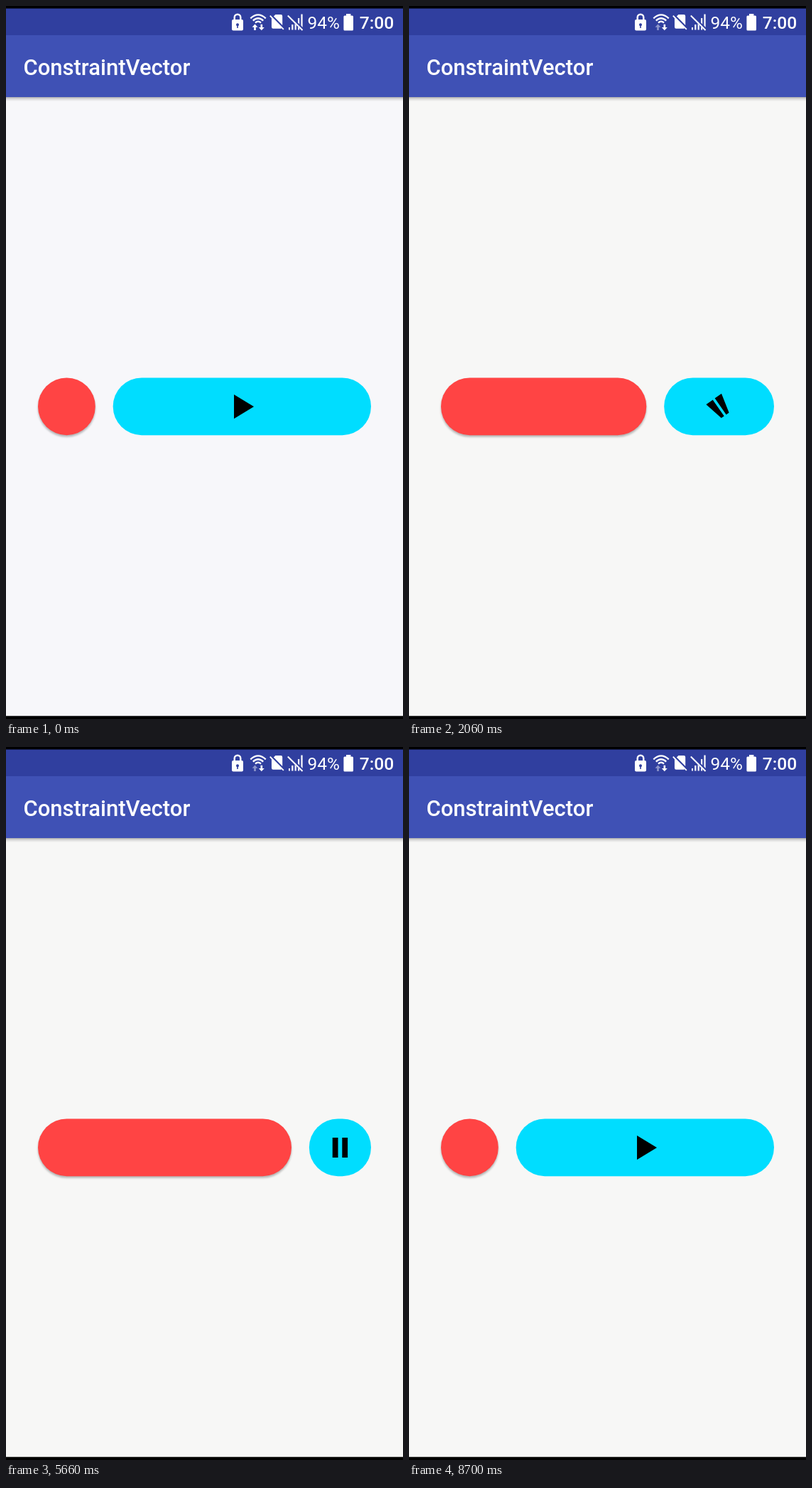
These frames come from a looping animation (559 px wide and 1002 px high, 8740 ms). An HTML page:

```html
<!DOCTYPE html>
<html lang="en">
<head>
<meta charset="utf-8">
<title>ConstraintVector</title>
<style>
  html, body { margin: 0; width: 100%; height: 100%; overflow: hidden; background: #000; }
  svg { display: block; width: 559px; height: 1002px; }
  text { font-family: Roboto, sans-serif; fill: #fff; }
  .line { fill: none; stroke: #fff; }
</style>
</head>
<body>
<svg viewBox="0 0 559 1002">
  <defs>
    <linearGradient id="fade" x1="0" y1="0" x2="0" y2="1">
      <stop offset="0" stop-opacity=".3"/>
      <stop offset=".4" stop-opacity=".13"/>
      <stop offset="1" stop-opacity="0"/>
    </linearGradient>
    <filter id="soft" x="-10%" y="-20%" width="120%" height="140%">
      <feGaussianBlur stdDeviation="1.5"/>
    </filter>
  </defs>

  <rect width="559" height="1002"/>
  <rect id="page" y="41" width="559" height="956.7"/>
  <rect y="128" width="559" height="6" fill="url(#fade)"/>
  <rect y="3.5" width="559" height="38" fill="#303f9f"/>
  <rect y="41" width="559" height="87" fill="#3f51b5"/>

  <!-- status bar -->
  <g fill="#fff">
    <rect x="318" y="19" width="16" height="15.5" rx="2"/>
    <path class="line" d="M321.7 20v-4a4.3 4.3 0 0 1 8.6 0v4" stroke-width="2.4"/>
    <circle cx="326" cy="26.2" r="2" fill="#303f9f"/>
    <rect x="325.2" y="26" width="1.6" height="5" fill="#303f9f"/>

    <g class="line" stroke-width="2.3">
      <path d="M344.3 17.4Q355 7.4 365.7 17.4"/>
      <path d="M347.8 20.6Q355 13.8 362.2 20.6"/>
      <path d="M351 23.6Q355 20 359 23.6"/>
    </g>
    <path id="up" d="M350.5 25.5l4 4.3h-2.7v4.2h-2.6v-4.2h-2.7z"/>
    <path d="M359.8 34.2l-4-4.3h2.7v-4.2h2.6v4.2h2.7z"/>

    <g transform="translate(368.5 8.8) scale(1.09)">
      <path d="M19 5q0-2-2-2h-7L7.7 5.3 19 16.7z"/>
      <path d="M3.6 3.9L2.4 5.1 5 7.8V19q0 2 2 2h10q.5 0 1-.3l1.9 1.9 1.2-1.2z"/>
    </g>

    <path d="M398 33.5h2v-3.5h-2zM402.2 33.5h2.2v-7.5h-2.2zM406.6 33.5h2.2v-11.5h-2.2zM411 33.5h2.2v-16.5h-2.2zM415.4 33.5h2.2V11.5h-2.2z"/>
    <path d="M398 13.5L418 33" stroke="#303f9f" stroke-width="4"/>
    <path class="line" d="M396.8 13.5L417.5 34" stroke-width="2"/>

    <path d="M479 11h6.4v2.4h2.1q1.5 0 1.5 1.5V33q0 1.5-1.5 1.5h-10.6q-1.5 0-1.5-1.5V14.9q0-1.5 1.5-1.5h2.1z"/>
  </g>
  <text x="424.5" y="32.4" font-size="24.4">94%</text>
  <text x="497.8" y="32.4" font-size="24.6" font-weight="500">7:00</text>
  <text x="24.4" y="96.6" font-size="31" font-weight="500">ConstraintVector</text>

  <!-- buttons -->
  <rect id="shade" x="45" y="525" height="80.5" rx="40.25" opacity=".28" filter="url(#soft)"/>
  <rect id="red" x="45" y="522.4" height="80.8" rx="40.4" fill="#ff4444"/>
  <rect id="cyan" y="522.4" height="80.8" rx="40.4" fill="#00ddff"/>
  <path id="icon"/>
</svg>
<script>
const LOOP = 8740, OPEN = 862, CLOSE = 5721, SPAN = 3000;
const LEFT = 45, RIGHT = 514, GAP = 24.85, SMALL = 80.8, GROW = 276.2;

// corners of the upper half of the icon; the lower half mirrors it
const PLAY = [[-11.3, -17], [16.7, -0.1], [16.7, 0], [-11.3, 0]];
const PAUSE = [[-14, -10.7], [14, -10.7], [14, -2.9], [-14, -2.9]];

const el = id => document.getElementById(id);
const set = (id, attrs) => {
  for (const k in attrs) el(id).setAttribute(k, attrs[k]);
};
const mix = (a, b, k) => a + (b - a) * k;

// cubic-bezier(x1, 0, .2, 1)
function bezier(x1, x) {
  if (x <= 0) return 0;
  if (x >= 1) return 1;
  let lo = 0, hi = 1;
  for (let i = 0; i < 24; i++) {
    const u = (lo + hi) / 2, v = 1 - u;
    if (3 * v * v * u * x1 + 0.6 * v * u * u + u * u * u < x) lo = u; else hi = u;
  }
  return lo * lo * (3 - 2 * lo);
}
const slowIn = x => bezier(0, x);
const fastOutSlowIn = x => bezier(0.4, x);

function iconPath(k) {
  const pts = PLAY.map((p, i) => [mix(p[0], PAUSE[i][0], k), mix(p[1], PAUSE[i][1], k)]);
  const half = s => 'M' + pts.map(([x, y]) => x.toFixed(2) + ' ' + (s * y).toFixed(2)).join('L') + 'Z';
  return half(1) + half(-1);
}

function draw(t) {
  const closing = t >= CLOSE;
  const part = (t - (closing ? CLOSE : OPEN)) / SPAN;
  const move = slowIn(part);
  const turn = fastOutSlowIn(part);

  const width = SMALL + GROW * (closing ? 1 - move : move);
  const x = LEFT + width + GAP;
  set('red', { width });
  set('shade', { width });
  set('cyan', { x, width: RIGHT - x });

  const angle = closing ? 90 * turn - 90 : 90 * turn;
  set('icon', {
    d: iconPath(closing ? 1 - turn : turn),
    transform: `translate(${(x + RIGHT) / 2} 563) rotate(${angle})`
  });

  set('up', { opacity: t < 1300 ? 1 : 0.45 });
  set('page', { fill: t < 760 ? '#f7f7fa' : '#f7f7f6' });
}

const start = performance.now();
function tick() {
  draw((performance.now() - start) % LOOP);
  requestAnimationFrame(tick);
}
draw(0);
requestAnimationFrame(tick);
</script>
</body>
</html>
```
